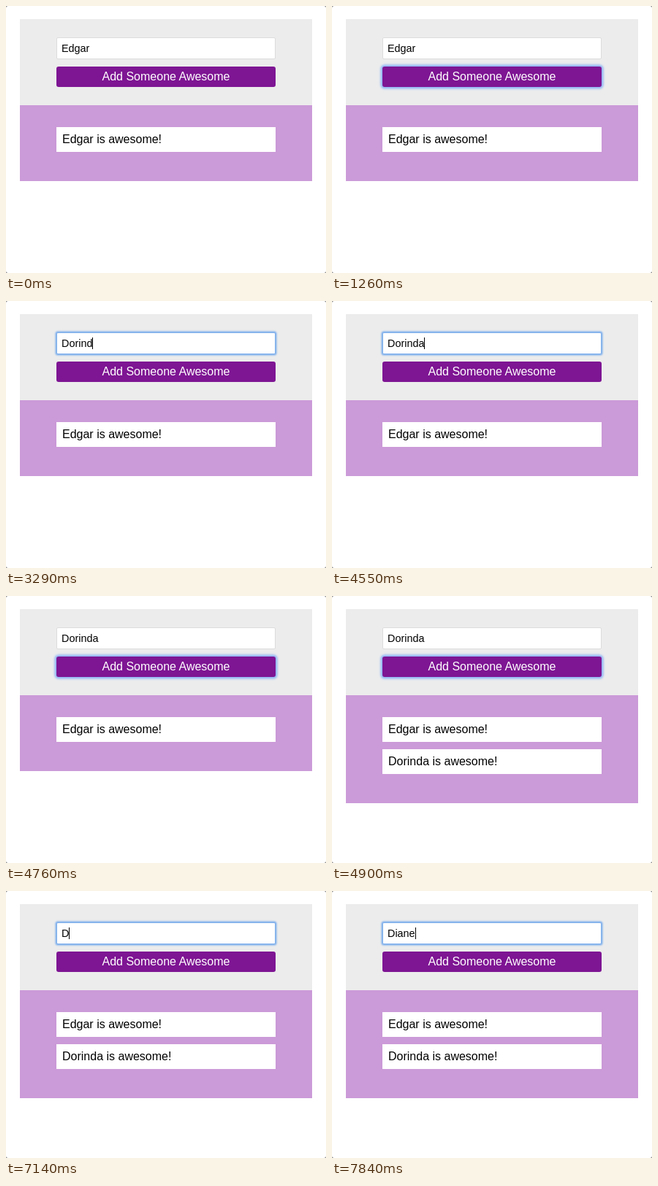
Write an HTML page that moves like this. It is 438 px wide and 366 px high and loops after 8000 ms.

```html
<!DOCTYPE html>
<html lang="en">
<head>
<meta charset="utf-8">
<title>Add Someone Awesome</title>
<style>
  html, body { margin: 0; width: 100%; height: 100%; overflow: hidden; background: #777; }
  #stage {
    position: relative; width: 438px; height: 366px; overflow: hidden;
    background: #fff; border-radius: 3px; color: #000;
    font: 16px "Liberation Sans", Arial, sans-serif;
  }
  #stage div { position: absolute; box-sizing: border-box; white-space: pre; }
  .form { left: 19px; top: 18px; width: 400px; height: 118px; background: #ececec; }
  .list { left: 19px; top: 136px; width: 400px; height: 104px; background: #cb9ad8; }
  .list.two { height: 148px; }
  .field, .button, .item { left: 50px; width: 300px; }
  .field {
    top: 25px; height: 30px; padding-left: 6px; line-height: 28px; font-size: 14.4px;
    background: #fff; border: 1px solid #dcdcdc; border-radius: 2px;
  }
  .field.focus { border-color: #7fb0ec; box-shadow: 0 0 2px 1.5px #7fb0ec; }
  .button {
    top: 65px; height: 28px; line-height: 28px; text-align: center;
    background: #7e1593; color: #fff; border-radius: 3px;
  }
  .button.focus { box-shadow: 0 0 3px 2.5px #8fb5f5; }
  .item { top: 30px; height: 34px; padding-left: 8px; line-height: 34px; background: #fff; }
  .item + .item { top: 74px; display: none; }
  .two .item + .item { display: block; }
  #marked { background: #b4d5fe; }
  #caret {
    display: inline-block; width: 1px; height: 16px; margin-right: -1px;
    vertical-align: -3px; background: #000;
  }
</style>
</head>
<body>
<div id="stage">
  <div class="form">
    <div class="field" id="field"><span id="plain"></span><span id="marked"></span><i id="caret"></i></div>
    <div class="button" id="button">Add Someone Awesome</div>
  </div>
  <div class="list" id="list">
    <div class="item">Edgar is awesome!</div>
    <div class="item">Dorinda is awesome!</div>
  </div>
</div>
<script>
  const LOOP = 8000;
  const [field, plain, marked, caret, button, list] =
    ["field", "plain", "marked", "caret", "button", "list"].map(id => document.getElementById(id));

  // Each entry: name, key press times, then [time, letters selected from the end]
  const entries = [
    { name: "Edgar", keys: [], drag: [[2030, 2], [2100, 4], [2170, 5]] },
    { name: "Dorinda", keys: [2660, 2800, 2940, 3080, 3150, 3290, 3500],
      drag: [[6020, 1], [6090, 2], [6160, 4], [6230, 5], [6300, 6], [6580, 7]] },
    { name: "Diane", keys: [7140, 7280, 7490, 7630, 7840], drag: [] }
  ];

  const within = (t, from, to) => t >= from && t < to;

  function render(t) {
    const entry = entries[t < 2660 ? 0 : t < 7140 ? 1 : 2];
    const typed = entry.keys.length ? entry.keys.filter(k => t >= k).length : entry.name.length;
    const picked = entry.drag.reduce((n, [at, count]) => t >= at ? count : n, 0);
    const text = entry.name.slice(0, typed);
    const editing = within(t, 1610, 4620) || t >= 5810;

    plain.textContent = text.slice(0, typed - picked);
    marked.textContent = text.slice(typed - picked);
    caret.style.visibility =
      editing && !picked && !within(t, 3990, 4550) ? "visible" : "hidden";
    field.classList.toggle("focus", editing);
    button.classList.toggle("focus", t >= 1050 && !editing);
    list.classList.toggle("two", t >= 4900);
  }

  const start = performance.now();
  function tick() {
    render((performance.now() - start) % LOOP);
    requestAnimationFrame(tick);
  }
  tick();
</script>
</body>
</html>
```
